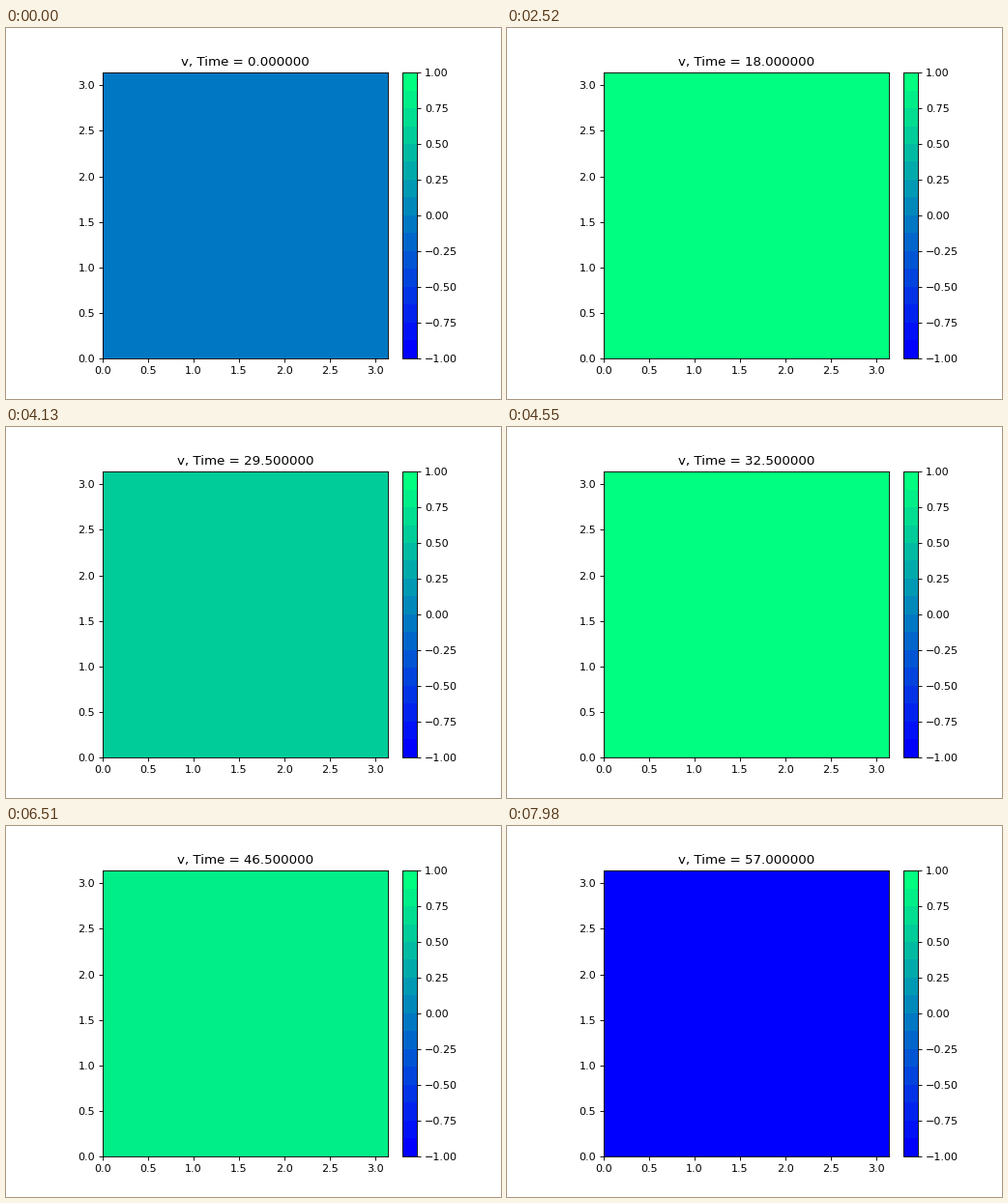
A matplotlib script that plays this animation: 512x384 px, repeating every 8000 ms.

```python
import numpy as np
import matplotlib.pyplot as plt
from matplotlib.animation import FuncAnimation

W, H, DPI = 512, 384, 80
TICK, STEP_MS, LOOP_MS = 20, 70, 8000
PERIOD, TROUGH = 16.3, 24.3     # bulk oscillation in model time
PEAK = 11.0                     # model time of the strongest pattern
LEVELS = np.linspace(-1, 1, 17)
CMAP = plt.get_cmap("winter", 16)

# centres of the bright spots, strongest first
CENTRES = [
    (1.58, 1.78), (2.63, 0.58), (0.08, 1.25), (3.04, 1.16), (1.18, 0.03),
    (1.34, 3.12), (0.03, 0.35), (3.02, 1.85), (0.04, 0.87), (3.12, 1.46),
    (0.02, 1.90), (3.06, 0.50), (0.52, 2.05), (2.14, 2.47), (1.36, 2.47),
    (2.76, 1.42), (1.70, 2.15), (2.97, 2.22), (1.73, 0.36), (0.36, 2.95),
    (2.28, 0.70), (0.97, 3.12),
]
HEIGHTS = np.linspace(1.9, 1.1, len(CENTRES))

# reaches just past the frame so the fill meets it
axis = np.linspace(0, 1.003 * np.pi, 110)
X, Y = np.meshgrid(axis, axis)


def spot(x, y, height):
    """Bright core with a faint dark halo, wider beside the side walls."""
    stretch = 1.1 + 0.4 * np.abs(x / np.pi - 0.5)
    r = np.hypot((X - x) / stretch, Y - y)
    return height * np.cos(11 * r) * np.exp(-r**2 / (2 * 0.12**2))


spots = sum(spot(x, y, h) for (x, y), h in zip(CENTRES, HEIGHTS))

# standing waves of similar wavelength, flat at the walls
rng = np.random.default_rng(7)
modes = np.arange(22)
ring = np.hypot(modes[:, None], modes[None, :])
ring = (ring > 13) & (ring < 20)
amp_a, amp_b = 0.014 * ring * rng.standard_normal((2, 22, 22))
waves = np.cos(np.outer(axis, modes))


def field(t):
    bulk = -1.2 * (1 - np.exp(-t**2 / 40)) * np.cos(2 * np.pi * (t - TROUGH) / PERIOD)
    if t < PEAK:
        s = t / PEAK
        strength = s * s * (3 - 2 * s)
    else:
        strength = np.exp(-((t - PEAK) / 3.2) ** 2)
    turn = 0.4 * (t - PEAK)
    ripple = waves @ (amp_a * np.cos(turn) + amp_b * np.sin(turn)) @ waves.T
    v = bulk + strength * (spots + ripple)
    return np.clip(v - 1e-6, -0.999, 0.999)


fig = plt.figure(figsize=(W / DPI, H / DPI), dpi=DPI, facecolor="white")
side = 0.77 * H
left = 0.5125 * W - 0.55 * side
ax = fig.add_axes([left / W, 0.11, side / W, 0.77])
cax = fig.add_axes([(left + 1.05 * side) / W, 0.11, 0.05 * side / W, 0.77])
title = ax.set_title("")


def paint(t):
    for old in list(ax.collections):
        old.remove()
    filled = ax.contourf(X, Y, field(t), levels=LEVELS, cmap=CMAP, vmin=-1, vmax=1)
    ax.set(xlim=(0, np.pi), ylim=(0, np.pi))
    title.set_text(f"v, Time = {t:.6f}")
    return filled


fig.colorbar(paint(0.0), cax=cax, ticks=LEVELS[::2], format="%.2f")
cax.set_yticks(LEVELS[::2], [f"{v:.2f}".replace("-", "\u2212") for v in LEVELS[::2]])
ax.set_xticks(np.arange(0, 3.1, 0.5))
ax.set_yticks(np.arange(0, 3.1, 0.5))
shown = {"step": 0}


def update(i):
    step = (i * TICK + TICK // 2) // STEP_MS
    if step != shown["step"]:
        paint(0.5 * step)
        shown["step"] = step
    return []


def reset():
    paint(0.0)
    shown["step"] = 0
    return []


anim = FuncAnimation(fig, update, frames=LOOP_MS // TICK, interval=TICK,
                     init_func=reset, repeat=True, repeat_delay=0, blit=False)
plt.show()
```
